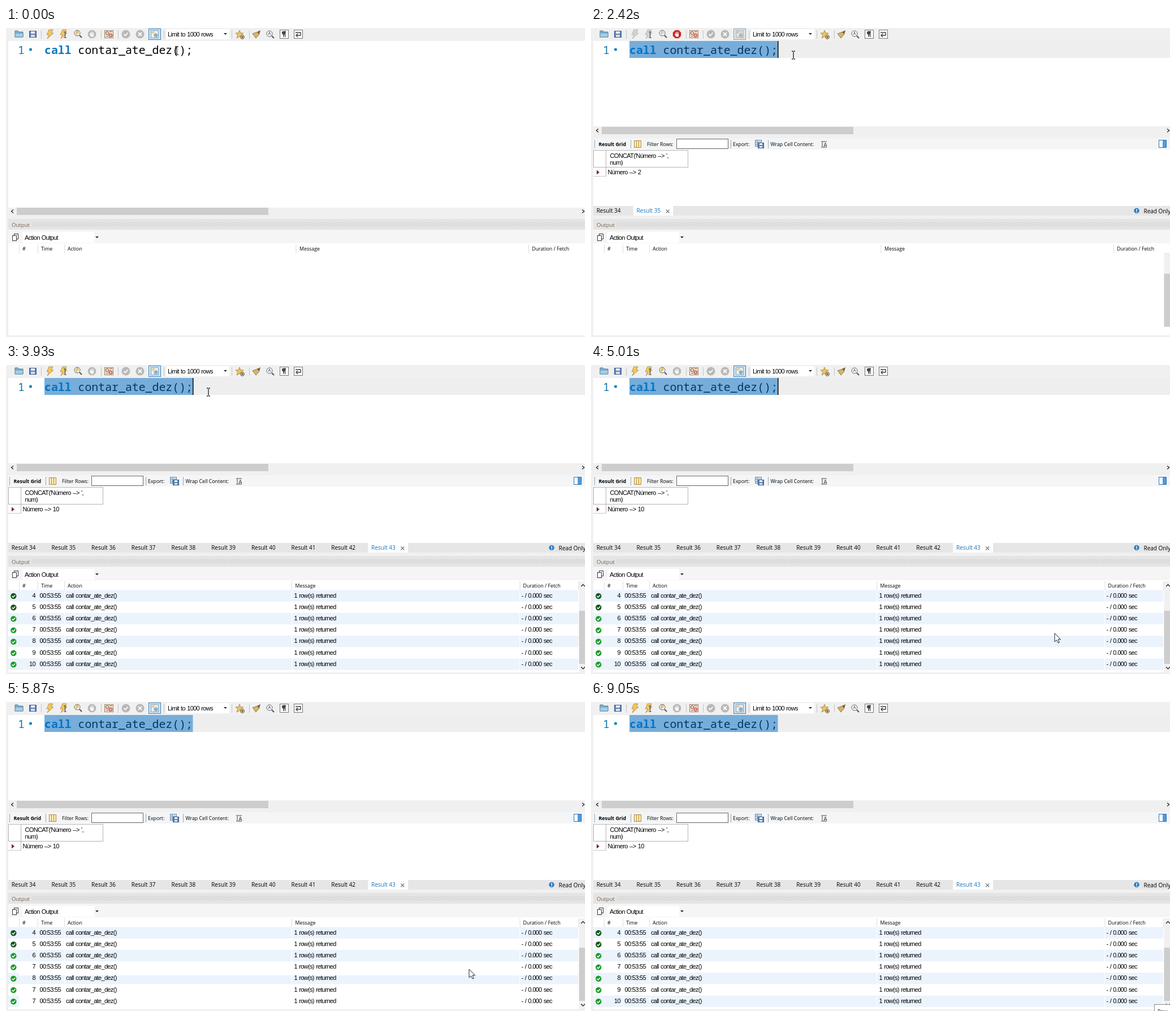
An HTML page for the animation above (9.14 s loop, 1024 px wide and 547 px high).

```html
<!DOCTYPE html>
<html lang="en">
<head>
<meta charset="utf-8">
<title>Query run</title>
<style>
html, body { margin: 0; width: 100%; height: 100%; overflow: hidden; background: #f0f0f0; }
svg { display: block; width: 100vw; height: 100vh; }
text { white-space: pre; fill: #000; }
.code { font: 19.85px "Noto Sans Mono", monospace; }
.ui { font: 11px "Liberation Sans", Arial, sans-serif; letter-spacing: -.66px; word-spacing: .8px; }
.head { font: 8.8px "Open Sans", "Noto Sans", sans-serif; }
.tab { font: 10px "Open Sans", "Noto Sans", sans-serif; }
</style>
</head>
<body>
<svg id="stage" viewBox="0 0 1024 547" preserveAspectRatio="none">
  <defs>
    <pattern id="dots" width="4" height="4" patternUnits="userSpaceOnUse">
      <path d="M0 0h1v1h-1zM2 2h1v1h-1z" fill="#b2b2b2"/>
    </pattern>
    <clipPath id="narrow"><rect x="4" y="190" width="183" height="96"/></clipPath>
  </defs>
</svg>
<script>
const LOOP = 9140;
const stage = document.getElementById('stage');

// markup helpers
const rect = (x, y, w, h, fill, extra = '') =>
  `<rect x="${x}" y="${y}" width="${w}" height="${h}" fill="${fill}" ${extra}/>`;
const frame = (x, y, w, h, line, fill = '#fff') =>
  rect(x + .5, y + .5, w - 1, h - 1, fill, `stroke="${line}"`);
const path = (d, fill, line = 'none', width = 1) =>
  `<path d="${d}" fill="${fill}" stroke="${line}" stroke-width="${width}"/>`;
const disc = (x, y, r, fill, line = 'none') =>
  `<circle cx="${x}" cy="${y}" r="${r}" fill="${fill}" stroke="${line}"/>`;
const text = (cls, x, y, s, extra = '') => `<text class="${cls}" x="${x}" y="${y}" ${extra}>${s}</text>`;
const at = (x, y, s) => `<g transform="translate(${x} ${y})">${s}</g>`;
const vline = (x, y, h, c = '#c4c4c4') => rect(x, y, 1, h, c);

// layers shown only inside their time ranges
const layers = [];
function add(markup, ...ranges) {
  const g = document.createElementNS('http://www.w3.org/2000/svg', 'g');
  g.innerHTML = markup;
  stage.append(g);
  if (ranges.length) layers.push({ g, ranges });
  return g;
}
const inside = (t, ranges) => ranges.some(([a, b]) => t >= a && t < b);

// icons, centred on 0,0
const BOLT = 'M-2 -8L5 -8L2 -2H6L-5 8L-2 1H-6Z';
const bolt = on => path(BOLT, on ? '#f3c75c' : '#d2d2d2', on ? '#a88745' : '#b0b0b0', .8);
const lens = path('M3 3L7 7', 'none', '#555', 2.2) + disc(-1, -1, 5, '#f5f7f8', '#666');
const hand = c => path('M-3 -7.5H3L7.5 -3V3L3 7.5H-3L-7.5 3V-3Z', c, '#fff', .5) +
  path('M-2.500 1V-3M-.8 0V-4.500M.9 0V-4.500M2.600 1V-3.500M-3.500 0L-1.500 4H2.500V0Z', '#fff', '#fff', .9);
const beamMark = path('M0 -4H5M2.5 -4V6M0 6H5', 'none', '#444', 1.2);
const boltSet = on => at(78, 11, bolt(on)) + at(102, 11, bolt(on) + beamMark) +
  at(127, 10, lens + at(-1, -1, `<g transform="scale(.5)">${bolt(on)}</g>`)) +
  at(152, 11, hand(on ? '#b9b9b9' : '#cf2222'));
const toggle = on => frame(252, 1, 22, 20, on ? '#3b84bd' : '#7fa9c9', on ? '#cfe3f2' : '#dbe4ea') +
  frame(256, 4, 14, 14, on ? '#7fa3bd' : '#b5b5b5', on ? '#e8eff3' : '#d8d8d8') +
  disc(261, 9, 3.5, on ? '#e5c98a' : '#c4c4c4') + disc(265, 13, 3.5, on ? '#8fb0c6' : '#b8b8b8') +
  path('M258 10L260 12L264 7', 'none', '#fff', 1.2);
const boxed = s => frame(-8, -8, 16, 16, '#777', '#fafafa') + s;
const downTri = (x, y) => path(`M${x - 3} ${y}h6l-3 3z`, '#222');
const arrows = y => path(`M13 ${y - 3}L9.500 ${y}L13 ${y + 3}M1019 ${y - 3}L1022.500 ${y}L1019 ${y + 3}`, 'none', '#333', 1.5);
const hScroll = y => rect(4, y, 1020, 14, '#f0f0f0') + rect(19, y, 445, 13, '#cdcdcd') + arrows(y + 6.5);

// main toolbar
add(rect(0, 0, 1024, 547, '#f0f0f0') +
  path('M16 6V5H21L23 7H30V16H16Z', '#7fb2d3', '#4f7f9f') + path('M16 9H30V16H16Z', '#a4cde6', '#5a8cae', .8) +
  frame(41, 5, 13, 12, '#3f5d91', '#5d80b8') + rect(44, 6, 7, 4, '#eef2f8') + rect(44, 12, 7, 4, '#d7e0ee') +
  [62, 168, 198, 279, 399, 430].map(x => vline(x, 4, 15)).join('') +
  frame(174, 4, 16, 14, '#9a8070', '#f4e6d6') + disc(179, 9, 2.8, '#f0d6b4', '#8a4f33') +
  disc(185, 13, 3, '#e9a59a', '#a8372a') + path('M183 6.500H188M177 14.500H181', 'none', '#7c6555', 1.2) +
  disc(212, 11, 7.5, '#b8b8b8') + path('M208.500 11L211 13.500L215.500 8.500', 'none', '#fff', 1.8) +
  disc(237, 11, 7.5, '#b8b8b8') + path('M234 8L240 14M240 8L234 14', 'none', '#fff', 1.8) +
  rect(283, 2, 112, 18, '#fff') + text('ui', 286, 15, 'Limit to 1000 rows') + downTri(388, 9) +
  at(413, 11, path('M0 -7L2 -2L7 -2L3 1.500L5 7L0 4L-5 7L-3 1.500L-7 -2L-2 -2Z', '#f3c25c', '#a07a38', .8) +
    disc(5, 5, 3.4, '#f7e3ad', '#5c4a2a') + path('M3 5H7M5 3V7', 'none', '#333')) +
  at(443, 11, path('M-7 -1L2 -4L5 0L-1 7Z', '#d6b36a', '#7e6431', .8) + path('M1 -4L7 -7L5 0Z', '#7b5a32')) +
  at(467, 11, lens + path('M-3 1L-1 -4L1 1M-2 -1H0', 'none', '#557', .8)) +
  at(492, 11, boxed(path('M3 -5H-1A2.500 2.500 0 0 0 -1 0V5M2 -5V5', '#444', '#444', 1.2))) +
  at(517, 11, boxed(path('M-5 -3H4V2H-3M-1 -1L-4 2L-1 5', 'none', '#444', 1.4))));
const BUSY = [1890, 3140];
const READY = [[0, BUSY[0]], [BUSY[1], LOOP]];
add(boltSet(true) + toggle(true), ...READY);
add(boltSet(false) + toggle(false), BUSY);

// editor
add(rect(4, 23, 1020, 295, '#fff'));
add(rect(68, 23, 956, 30, '#eee'), [400, 3140], [3930, LOOP]);
add(text('code', 21, 45.5, '1', 'style="fill:#0b74a8"') + disc(43.5, 38, 2.6, '#1588c8') +
  text('code', 68, 45.5, '<tspan font-weight="bold" fill="#0d78c0">call</tspan> contar_ate_dez();'));
add(rect(68, 23, 262.5, 30, '#006fc8', 'opacity=".5"'), [480, LOOP]);
add(rect(68, 23, 1.6, 30, '#111'), [790, 1020], [1570, 2270]);
add(rect(330, 23, 1.6, 30, '#111'), [400, 790], [2270, 3140], [3930, 4410], [4940, 5470],
  [6020, 6530], [7060, 7590], [8120, 8650]);
add(hScroll(318), [0, 2270]);

// result panel
const gridBar = vline(6, 198, 15, '#8fa9bd') + text('head', 13.5, 209, 'Result Grid', 'style="font-weight:700"') +
  vline(70, 198, 15, '#8fa9bd') + frame(76, 199, 13, 13, '#b08a3c', '#fbeab8') +
  path('M80.500 200V211M84.500 200V211', 'none', '#b98f35', 1) +
  text('head', 99, 209, 'Filter Rows:') + frame(151, 196, 92, 18, '#666');
const wideBar = vline(247, 198, 15, '#8fa9bd') + text('head', 251, 209, 'Export:') +
  frame(290, 198, 12, 12, '#6b89a5', '#d7e6f2') + path('M291 202H301M291 206H301M294 199V209', 'none', '#7896b0') +
  frame(295, 203, 11, 10, '#3f5f8f', '#5c82b5') + rect(298, 204, 5, 3, '#fff') + rect(298, 209, 5, 3, '#dde6f0') +
  vline(313, 198, 15, '#8fa9bd') + text('head', 317.5, 209, 'Wrap Cell Content:') +
  path('M407 201H417M407 211H417M409 202V210M412 210L414.500 203L417 210M413 208H416', 'none', '#444') +
  frame(1004, 198, 14, 14, '#2f72ad') + rect(1011, 199, 6, 12, '#4f9bdc');
const grid = frame(4, 216, 168, 31, '#b4b4b4') + rect(4, 247, 23, 16, '#fff') +
  vline(26, 216, 47, '#b4b4b4') + rect(4, 262, 23, 1, '#c8c8c8') +
  text('ui', 33.5, 230, "CONCAT('Número --&gt; ',") + text('ui', 33.5, 242, 'num)') +
  path('M10 251.500L15 255.500L10 259.500Z', '#6a3038');
add(rect(4, 174, 1020, 21, '#f0f0f0') + hScroll(175) + rect(4, 195, 1020, 20, '#f4f5f7') + gridBar + wideBar, [2100, LOOP]);
add(rect(4, 215, 1020, 100, '#fff'), [2270, LOOP]);
add(rect(4, 195, 1020, 137, '#e6e6e6') + rect(4, 195, 183, 91, '#fff') + rect(4, 195, 183, 20, '#f4f5f7') +
  `<g clip-path="url(#narrow)">${gridBar}</g>`, [2740, 3930]);
add(grid, [2350, LOOP]);
const count = add(text('ui', 29.5, 259, ''), [2350, LOOP]).firstChild;
const tabs = add('', [2270, LOOP]);
const tabBar = last => {
  let s = rect(4, 315, 1020, 17, '#e6e6e6');
  for (let i = 0; i <= last; i++) {
    const x = 4 + 70.7 * i, on = i === last;
    if (on) s += rect(x, 315, 70.7, 17, '#fff') +
      path(`M${x + 58} 321.500l6 6m0 -6l-6 6`, 'none', '#777', 1.2);
    s += text('tab', x + 5.7, 327, 'Result ' + (34 + i), on ? 'style="fill:#1a74bd"' : '');
  }
  return s + disc(965, 323.5, 4.7, '#2d7cc4') + rect(964.3, 320.5, 1.5, 4, '#fff') +
    rect(964.3, 325.5, 1.5, 1.5, '#fff') + text('tab', 977.5, 328, 'Read Only');
};

// output panel
add(rect(4, 338, 1020, 19, '#e4e4e4') + rect(45, 344, 979, 7, 'url(#dots)') +
  text('tab', 10, 351.5, 'Output', 'style="fill:#75604c;font-size:9.6px"') +
  rect(4, 357, 1020, 24, '#f5f5f5') + rect(29, 361, 127, 19, '#fff') +
  frame(14, 364, 8, 10, '#333') + frame(11, 367, 8, 10, '#333') +
  text('ui', 33, 374.5, 'Action Output') + downTri(161, 369) +
  rect(4, 381, 1020, 163, '#fff') +
  [23, 56, 103].map(x => vline(x, 383, 16, '#dedede')).join('') +
  text('head', 29, 394, '#') + text('head', 62, 394, 'Time') + text('head', 109, 394, 'Action'));
const header = (msg, dur) => vline(msg - 6.5, 383, 16, '#dedede') + vline(dur - 6, 383, 16, '#dedede') +
  text('head', msg, 394, 'Message') + text('head', dur, 394, 'Duration / Fetch');
add(header(519, 930), [0, 3140]);
add(header(511.5, 914.5) + vline(1012, 383, 16, '#dedede'), [3140, LOOP]);

// list rows: bands, then leftovers of a half-finished scroll, then text
const STALE = [5870, 5940];
const rowTop = i => 398.4 + 20.2 * i;
for (let i = 0; i < 7; i += 2) {
  add(rect(4, rowTop(i), 1008, 20.2, '#ebf3fd') +
    [56, 103, 505, 908].map(x => vline(x, rowTop(i), 20.2, '#fff')).join(''), [i ? 3210 : 3140, LOOP]);
}
add(rect(23, 479, 989, 5, '#fff') + rect(23, 519, 989, 21, '#fff'), STALE);
const labels = [];
for (let i = 0; i < 7; i++) {
  const y = rowTop(i), base = y + 13.2;
  const row = add(text('ui', 52, base, '', 'text-anchor="end"') + text('ui', 59.5, base, '00:53:55') +
    text('ui', 106, base, 'call contar_ate_dez()') + text('ui', 509.5, base, '1 row(s) returned') +
    text('ui', 911.5, base, '- / 0.000 sec'), [i ? 3210 : 3140, LOOP]);
  labels.push(row.querySelector('text'));
  add(disc(13.3, y + 10.6, 5.2, i < 2 ? '#17581f' : '#1c9b2a') +
    path(`M10.600 ${y + 10.6}l2 2.200l3.600 -4`, 'none', '#fff', 1.5), [i < 2 ? 3140 : 3210, LOOP]);
}
add(rect(1013.5, 398, 10.5, 131, '#f0f0f0'), [2270, LOOP]);
add(rect(1013.5, 383, 10.5, 15, '#f0f0f0') + rect(1013.5, 529, 10.5, 15, '#f0f0f0') +
  path('M1017 392L1020.500 388.500L1024 392M1017 534.500L1020.500 538L1024 534.500', 'none', '#333', 1.5), [3210, LOOP]);
const thumb = add(rect(1013.5, 435, 10.5, 94, '#cdcdcd'), [2270, LOOP]);

const tip = add(frame(996, 535, 40, 30, '#8a8a8a') + text('head', 1002, 551, 'Row'), [8900, LOOP]);

// pointers
const beam = add(path('M-3 -7H-.700M.700 -7H3M0 -6.500V6.500M-3 7H-.700M.700 7H3', 'none', '#222', 1.3));
const arrow = add(path('M0 0V15L3.500 11.800L6 17L8.300 16L6 10.800H10.500Z', '#fff', '#222', 1));

const MOVES = [
  { from: 70, to: 250, steps: 3, pts: [[302, 40], [358, 48]] },
  { from: 4230, to: 5010, steps: 11, pts: [[358, 48], [470, 150], [680, 330], [850, 450], [897, 478], [855, 478], [820, 475]] },
  { from: 5260, to: 5470, steps: 4, pts: [[820, 475], [819, 473]] },
  { from: 6420, to: 7260, steps: 12, pts: [[819, 473], [600, 455], [300, 430], [90, 408], [58, 420], [64, 465], [82, 502]] },
  { from: 7340, to: 8190, steps: 12, pts: [[82, 502], [200, 490], [420, 480], [680, 490], [880, 515], [968, 550]] },
];
function along(pts, p) {
  const f = p * (pts.length - 1), i = Math.min(Math.floor(f), pts.length - 2), k = f - i;
  return [0, 1].map(n => pts[i][n] + (pts[i + 1][n] - pts[i][n]) * k);
}
function pointer(t) {
  let pos = MOVES[0].pts[0];
  for (const m of MOVES) {
    if (t < m.from) break;
    const gap = (m.to - m.from) / (m.steps - 1);
    pos = along(m.pts, Math.min(1, (Math.floor((t - m.from) / gap) + 1) / m.steps));
  }
  return pos;
}

// value of the last step reached
const stepAt = (t, table) => table.reduce((v, [time, next]) => t >= time ? next : v, table[0][1]);
const TABS = [[0, 0], [2420, 1], [2590, 2], [2740, 3], [2890, 4], [3140, 5], [3380, 6], [3530, 7], [3700, 8], [3850, 9]];
const COUNTS = [[0, 1], [2420, 2], [2890, 4], [2970, 5], [3210, 6], [3380, 7], [3530, 8], [3700, 9], [3850, 10]];
const FIRST = [[0, 4], [5260, 3], [5330, 2], [5400, 1], [5870, 4]];
let shownTab = -1;

function draw(t) {
  for (const { g, ranges } of layers) g.style.display = inside(t, ranges) ? '' : 'none';

  const tab = stepAt(t, TABS);
  if (tab !== shownTab) tabs.innerHTML = tabBar(shownTab = tab);
  count.textContent = 'Número --> ' + stepAt(t, COUNTS);

  const first = stepAt(t, FIRST), stale = inside(t, [STALE]);
  labels.forEach((label, i) => { label.textContent = stale && i > 4 ? 7 : first + i; });
  thumb.setAttribute('transform', `translate(0 ${(first - 4) * 12.3})`);

  const [x, y] = pointer(t), editing = y < 174;
  beam.style.display = editing ? '' : 'none';
  arrow.style.display = editing || t >= 8190 ? 'none' : '';
  (editing ? beam : arrow).setAttribute('transform', `translate(${x} ${y})`);

  tip.setAttribute('opacity', stepAt(t, [[0, .35], [8980, .7], [9050, 1]]));
}

const start = performance.now();
function tick() {
  draw((performance.now() - start) % LOOP);
  requestAnimationFrame(tick);
}
tick();
</script>
</body>
</html>
```
